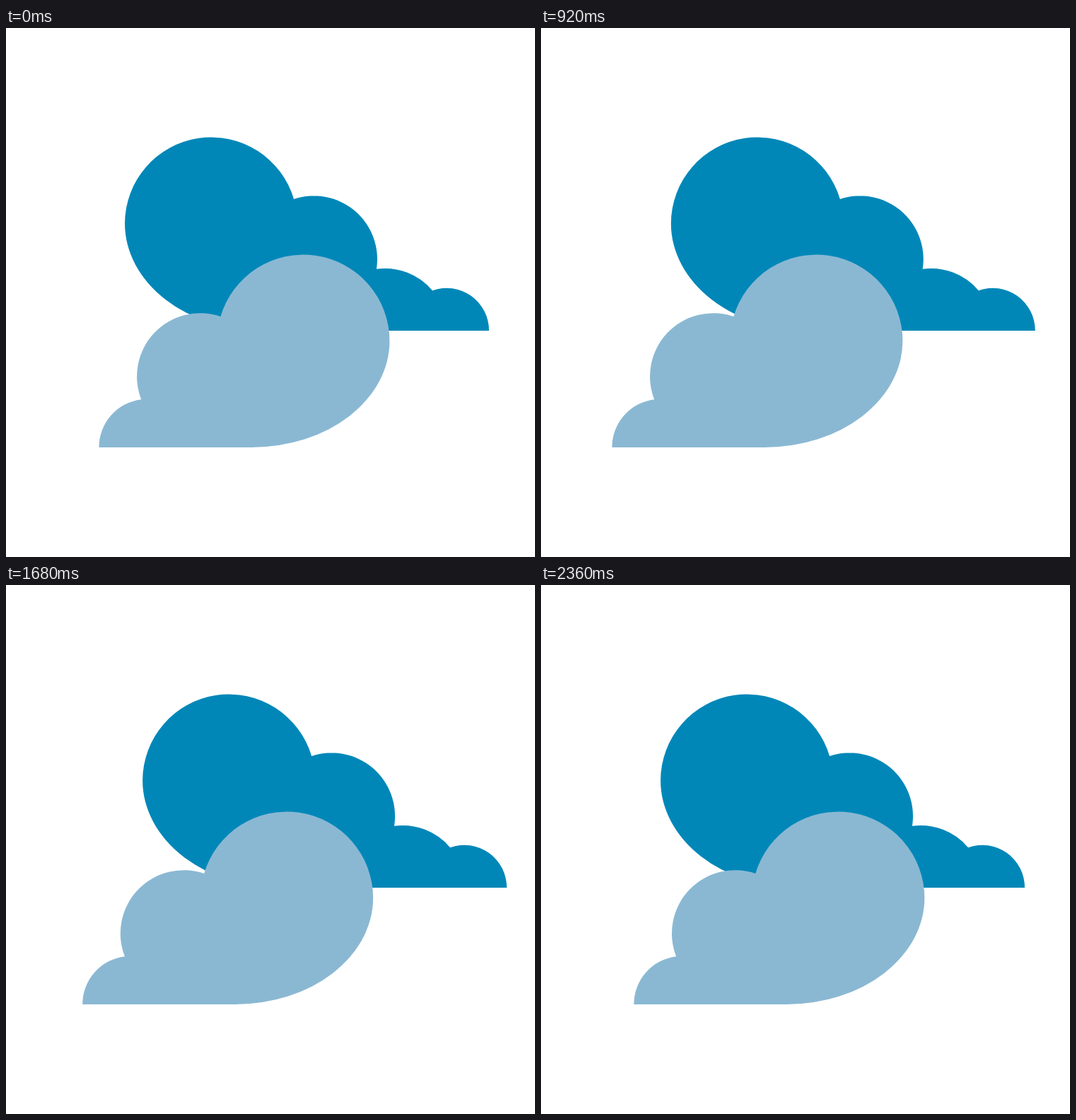
Recreate the animation shown at these times as an HTML page. Size 748 px wide and 748 px high, loop 2.4 s.

```html
<!DOCTYPE html>
<html lang="en">
<head>
<meta charset="utf-8">
<title>Drifting clouds</title>
<style>
  html, body { margin: 0; width: 100%; height: 100%; overflow: hidden; background: #fff; }
  svg { display: block; width: 100%; height: 100%; }
</style>
</head>
<body>
<svg viewBox="0 0 748 748">
  <path id="back" fill="#0087b8" d="M695.5 428
    A60 60 0 0 0 615.5 371.2
    A88 88 0 0 0 536.4 340.8
    A89.5 89.5 0 0 0 419.6 242
    A122 122 0 0 0 180.6 276.5
    A195 151.5 0 0 0 375.6 428Z"/>
  <path id="front" fill="#8ab8d3" d="M113.7 593
    A68.2 68.2 0 0 1 173.4 525.2
    A89.5 89.5 0 0 1 285.6 408
    A122 122 0 0 1 524.6 442.5
    A195 150.5 0 0 1 329.6 593Z"/>
</svg>
<script>
  const LOOP = 2400, STEP = 40;
  // Each cloud sways sideways around its resting place; peak is the time in ms of full reach.
  const clouds = [
    { id: "back", reach: -15.5, peak: 240 },
    { id: "front", reach: 17.8, peak: 0 }
  ].map(c => ({ ...c, el: document.getElementById(c.id) }));

  const start = performance.now();

  function draw() {
    const t = Math.floor((performance.now() - start) / STEP) * STEP % LOOP;
    for (const { el, reach, peak } of clouds) {
      const x = reach * Math.cos((t - peak) / LOOP * 2 * Math.PI);
      el.setAttribute("transform", `translate(${x.toFixed(2)} 0)`);
    }
    requestAnimationFrame(draw);
  }
  draw();
</script>
</body>
</html>
```
